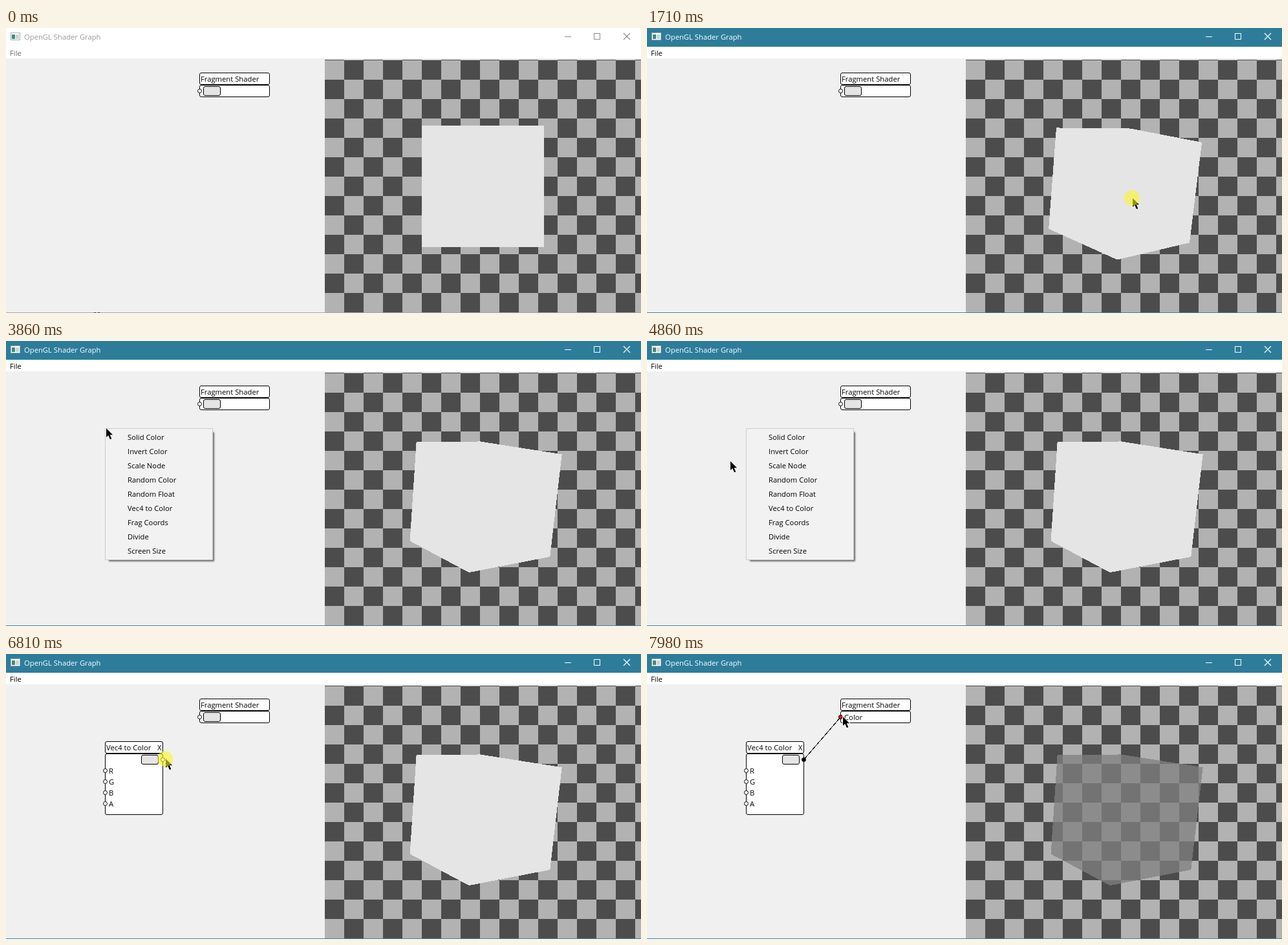
Write an HTML page that moves like this. It is 982 px wide and 441 px high and loops after 8 s.

```html
<!DOCTYPE html>
<html lang="en">
<head>
<meta charset="utf-8">
<title>OpenGL Shader Graph</title>
<style>
  html, body { margin: 0; width: 100%; height: 100%; overflow: hidden; background: #f0f0f0; }
  svg { display: block; }
  text { font: 11.25px "Open Sans", "Noto Sans", sans-serif; fill: #000; white-space: pre; }
  .crisp { shape-rendering: crispEdges; }
  .box { fill: #fff; stroke: #000; }
  .swatch { fill: #e5e5e5; stroke: #000; }
  .port { fill: #fff; stroke: #000; }
  .buttons { fill: none; stroke: #fff; }
  #caption { fill: #2d7d9a; }
  #title { fill: #fff; }
  #edge { fill: #3b88aa; }
  .idle #caption { fill: #fff; }
  .idle #title { fill: #999; }
  .idle #file { fill: #6d6d6d; }
  .idle .buttons { stroke: #8c8c8c; }
  .idle #edge { fill: #a8a8a8; }
  #specks { display: none; }
  .idle #specks { display: block; }
</style>
</head>
<body>
<svg id="stage" width="982" height="441" viewBox="0 0 982 441">
  <defs>
    <pattern id="checker" patternUnits="userSpaceOnUse" x="493" y="50" width="60" height="60">
      <rect width="60" height="60" fill="#b2b2b2"/>
      <path d="M30 0h30v30h-30zM0 30h30v30h-30z" fill="#4c4c4c"/>
    </pattern>
    <filter id="shadow" x="-5%" y="-5%" width="112%" height="112%">
      <feGaussianBlur stdDeviation="1"/>
    </filter>
  </defs>

  <rect width="982" height="441" fill="#f0f0f0"/>
  <rect id="caption" width="982" height="29"/>
  <g class="crisp">
    <rect x="7.5" y="7.5" width="14" height="11" fill="#fff" stroke="#a9b1b1"/>
    <rect x="9" y="10" width="5" height="7" fill="#3f8a82"/>
    <rect x="15" y="10" width="5" height="7" fill="#cbd3d3"/>
  </g>
  <text id="title" x="28" y="18">OpenGL Shader Graph</text>
  <g class="buttons">
    <path class="crisp" d="M864 13.5h10M909.5 8.5h9v9h-9z"/>
    <path d="M955 8l10 10M965 8l-10 10" stroke-width="1.2"/>
  </g>
  <rect y="29" width="982" height="18" fill="#fff"/>
  <text id="file" x="6" y="43">File</text>

  <g class="crisp">
    <rect x="493" y="49" width="489" height="391" fill="url(#checker)"/>
    <path id="cube"/>
    <rect id="edge" y="440" width="982" height="1"/>
    <path id="specks" d="M136 440h3M142 440h3" stroke="#333"/>
  </g>

  <g id="fragment">
    <rect class="box" x="299.5" y="69.5" width="108" height="18" rx="2.5"/>
    <rect class="box" x="299.5" y="88.5" width="108" height="18" rx="2.5"/>
    <text x="301" y="83">Fragment Shader</text>
    <rect id="input" class="swatch" x="305.5" y="90.5" width="26" height="14" rx="2.5"/>
    <text id="inputName" x="305" y="102">Color</text>
  </g>

  <g id="vec">
    <rect class="box" x="153.5" y="135.5" width="89" height="18" rx="2.5"/>
    <rect class="box" x="153.5" y="154.5" width="89" height="94" rx="2.5"/>
    <text x="155" y="149">Vec4 to Color</text>
    <text x="234" y="149">X</text>
    <rect class="swatch" x="209.5" y="156.5" width="26" height="14" rx="2.5"/>
  </g>

  <line id="wire" class="crisp" x1="242.5" y1="163.5" stroke="#000"/>
  <circle id="target" class="port" cx="299.5" cy="97.5" r="3"/>
  <circle id="output" class="port" cx="242.5" cy="163.5" r="3"/>

  <g id="menu">
    <rect x="159" y="141" width="163" height="200" opacity=".55" filter="url(#shadow)"/>
    <rect x="153.5" y="135.5" width="166" height="203" fill="#f2f2f2" stroke="#ccc"/>
  </g>
  <g id="rows"></g>

  <path id="arrow" d="M0 0V14L3.2 11L6 17.3L8.4 16.2L5.7 10.3H10.2Z"
        stroke="#fff" stroke-width="1.6" paint-order="stroke"/>
  <circle id="glow" r="12" fill="rgb(251,247,35)" opacity=".6"/>
</svg>

<script>
const LOOP = 8000, TICK = 78.5;
const ACTIVATE = 840, RELEASE = 2080, MENU = 3700, PICK = 5480, WIRE = 6810, LINK = 7900;

const $ = id => document.getElementById(id);
const show = (el, on) => { el.style.display = on ? '' : 'none'; };

function add(parent, tag, attrs, label) {
  const el = document.createElementNS('http://www.w3.org/2000/svg', tag);
  for (const k in attrs) el.setAttribute(k, attrs[k]);
  if (label) el.textContent = label;
  parent.appendChild(el);
  return el;
}

const rows = ['Solid Color', 'Invert Color', 'Scale Node', 'Random Color', 'Random Float',
  'Vec4 to Color', 'Frag Coords', 'Divide', 'Screen Size'].map((label, i) => {
  const g = add($('rows'), 'g', {});
  const bar = add(g, 'rect', { x: 156, y: 138 + 22 * i, width: 161, height: 22, fill: '#91c9f7' });
  add(g, 'text', { x: 188, y: 153 + 22 * i }, label);
  return { g, bar };
});

[...'RGBA'].forEach((c, i) => {
  const y = 180.5 + 17 * i;
  add($('vec'), 'circle', { class: 'port', cx: 153.5, cy: y, r: 3 });
  add($('vec'), 'text', { x: 159, y: y + 4.5 }, c);
});

// Pointer gestures: when, where to, and how far the path bows sideways
const moves = [
  { from: 210, until: 370, to: [784, 280] },
  { from: 520, until: 670, to: [706, 255] },
  { from: ACTIVATE, until: 1630, to: [752, 263], bow: [23, 33] },
  { from: 1710, until: 1930, to: [746, 263] },
  { from: RELEASE, until: 2620, to: [213, 193] },
  { from: 2870, until: 3480, to: [155, 135], bow: [-50, 0] },
  { from: 4400, until: 5180, to: [225, 260], bow: [-67, -20] },
  { from: 5630, until: 6200, to: [241, 171] },
  { from: 6280, until: 6430, to: [246, 163.5] },
  { from: WIRE, until: 7600, to: [299, 97] },
  { from: LINK, until: 7980, to: [303, 97] }
];

// The screen refreshes once per tick while the pointer moves
function pointer(t) {
  let pos = [920, 475];
  for (const { from, until, to, bow = [0, 0] } of moves) {
    if (t < from) break;
    const gaps = Math.round((until - from) / TICK);
    const step = Math.floor((t - from) / (until - from) * gaps + 1e-6);
    const f = Math.min(1, (step + 1) / (gaps + 1));
    const s = f * f * (3 - 2 * f);
    pos = pos.map((p, k) => p + (to[k] - p) * s + bow[k] * 4 * s * (1 - s));
  }
  return pos.map(Math.round);
}

// Outline of the visible faces of a unit cube, 3 units away, 45 degree field of view
function cubePath(yaw, pitch) {
  const rad = Math.PI / 180;
  const [s, c, p, q] = [Math.sin(yaw * rad), Math.cos(yaw * rad), Math.sin(pitch * rad), Math.cos(pitch * rad)];
  // Bit k of a corner index selects the sign along axis k
  const corner = i => {
    const [x, y, z] = [0, 1, 2].map(k => (i >> k & 1) - 0.5);
    const v = y * q - z * p, w = y * p + z * q;
    const m = 472 / (3 - (c * w - s * x));
    return [737.8 + (c * x + s * w) * m, 244.9 + v * m];
  };
  let path = '';
  for (let k = 0; k < 3; k++) {
    const [i, j, l] = [k, (k + 1) % 3, (k + 2) % 3].map(n => 1 << n);
    for (const quad of [[i, i + j, i + j + l, i + l], [0, l, j + l, j]]) {
      const pts = quad.map(corner);
      const [a, b, d] = pts;
      const front = (b[0] - a[0]) * (d[1] - a[1]) > (b[1] - a[1]) * (d[0] - a[0]);
      if (front) path += 'M' + pts.map(n => n.map(v => v.toFixed(2)).join(' ')).join('L') + 'Z';
    }
  }
  return path;
}

function draw(t) {
  const within = (a, b) => t >= a && t < b;
  const [x, y] = pointer(t);
  const linked = t >= LINK;
  const made = t >= PICK;
  const dragging = within(WIRE, LINK);

  $('stage').classList.toggle('idle', t < ACTIVATE);

  // Dragging turns the cube one degree per pixel
  const [ox, oy] = t < ACTIVATE ? [706, 255] : pointer(Math.min(t, RELEASE - 1));
  $('cube').setAttribute('d', cubePath(ox - 706, 255 - oy));
  $('cube').setAttribute('fill', linked ? 'rgba(128,128,128,.755)' : '#e5e5e5');

  // The picked row lingers and fades after the menu closes
  const open = within(MENU, PICK);
  const fade = made ? Math.max(0, 1 - (t - PICK) / 230) : 0;
  const hover = x >= 156 && x < 317 && t >= 4400 ? Math.floor((y - 138) / 22) : -1;
  show($('menu'), open);
  rows.forEach(({ g, bar }, i) => {
    const picked = i === 5 && fade > 0;
    show(g, open || picked);
    show(bar, picked || i === hover);
    g.setAttribute('opacity', picked ? fade : 1);
  });

  show($('vec'), made);
  show($('output'), made);
  show($('input'), !linked);
  show($('inputName'), linked);
  $('output').style.fill = linked ? '#000' : '#fff';
  $('target').style.fill = linked ? '#e01010' : '#fff';

  show($('wire'), dragging || linked);
  $('wire').setAttribute('x2', linked ? 299.5 : x - 0.5);
  $('wire').setAttribute('y2', linked ? 97.5 : y + 0.5);

  show($('arrow'), t >= 210);
  $('arrow').setAttribute('transform', `translate(${x} ${y})`);
  show($('glow'), within(ACTIVATE, RELEASE) || within(3630, 3860) || within(5410, PICK) || dragging);
  $('glow').setAttribute('cx', x - 1);
  $('glow').setAttribute('cy', y);
}

const start = performance.now();
function tick() {
  draw((performance.now() - start) % LOOP);
  requestAnimationFrame(tick);
}
tick();
</script>
</body>
</html>
```
